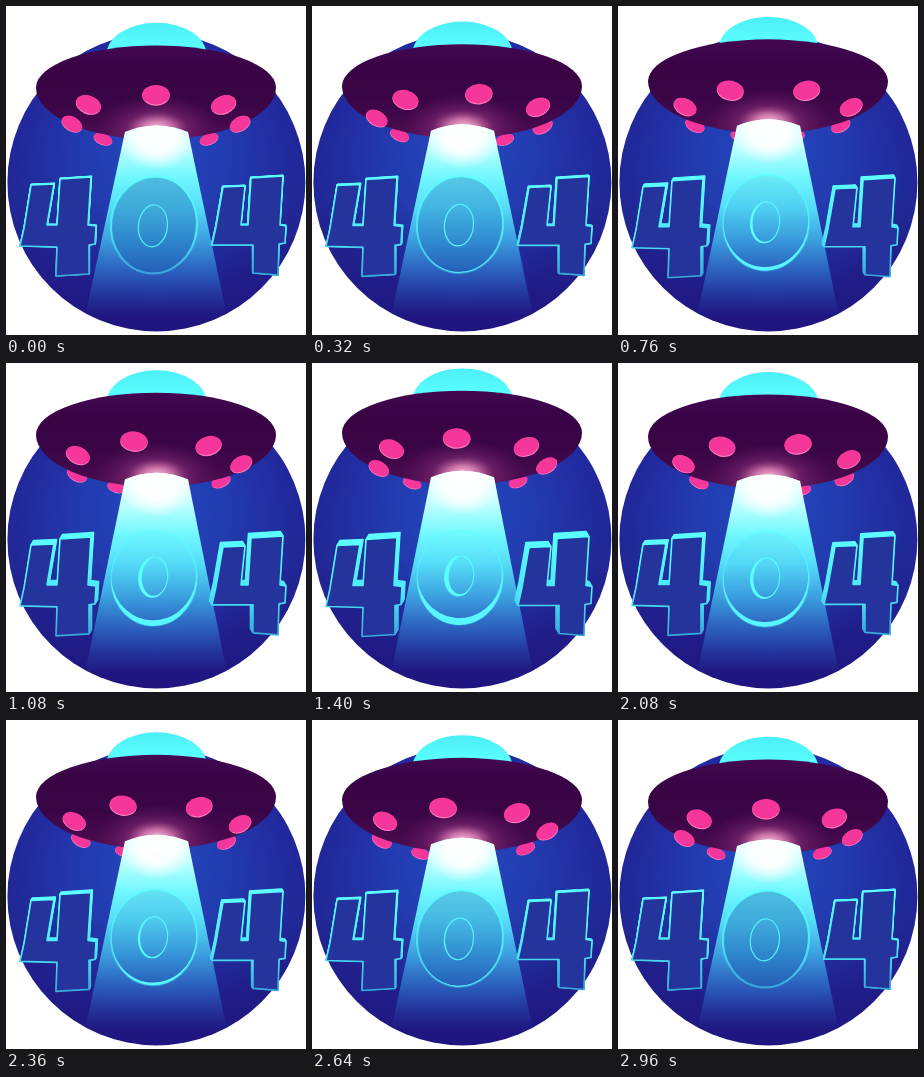
Animation, 300 px wide and 329 px high, one loop 3 s. Source, as an HTML page:

```html
<!DOCTYPE html>
<html lang="en">
<head>
<meta charset="utf-8">
<title>404</title>
<style>
  html, body { margin: 0; width: 100%; height: 100%; overflow: hidden; background: #fff; }
  svg { display: block; width: 300px; height: 329px; }
</style>
</head>
<body>
<svg viewBox="0 0 300 329" role="img" aria-label="404">
  <defs>
    <clipPath id="disc"><circle cx="150.4" cy="176.4" r="149"/></clipPath>
    <linearGradient id="sky" x2="0" y2="1">
      <stop offset="0" stop-color="#22209a"/>
      <stop offset=".6" stop-color="#212896"/>
      <stop offset="1" stop-color="#20147e"/>
    </linearGradient>
    <radialGradient id="haze" gradientUnits="userSpaceOnUse" cx="150" cy="145" r="150">
      <stop offset="0" stop-color="#234fc8" stop-opacity=".9"/>
      <stop offset=".5" stop-color="#2346bc" stop-opacity=".65"/>
      <stop offset="1" stop-color="#2240b4" stop-opacity="0"/>
    </radialGradient>
    <linearGradient id="ray" gradientUnits="userSpaceOnUse" x1="0" y1="112" x2="0" y2="310">
      <stop offset="0" stop-color="#efffff"/>
      <stop offset=".14" stop-color="#c4ffff"/>
      <stop offset=".3" stop-color="#70f8ff"/>
      <stop offset=".45" stop-color="#55dcf8"/>
      <stop offset=".62" stop-color="#3ca4e2" stop-opacity=".95"/>
      <stop offset=".8" stop-color="#2c68c4" stop-opacity=".75"/>
      <stop offset="1" stop-color="#2450b0" stop-opacity="0"/>
    </linearGradient>
    <linearGradient id="glass" x2="0" y2="1">
      <stop offset="0" stop-color="#4aeef6"/>
      <stop offset=".4" stop-color="#5cffff"/>
    </linearGradient>
    <linearGradient id="hull" x2="0" y2="1">
      <stop offset="0" stop-color="#420852"/>
      <stop offset=".25" stop-color="#390345"/>
      <stop offset=".6" stop-color="#3a0546"/>
      <stop offset="1" stop-color="#4c0c50"/>
    </linearGradient>
    <radialGradient id="glow">
      <stop offset="0" stop-color="#ffc9e4"/>
      <stop offset=".25" stop-color="#e688bb" stop-opacity=".8"/>
      <stop offset=".5" stop-color="#9c3a86" stop-opacity=".42"/>
      <stop offset="1" stop-color="#7a1c6a" stop-opacity="0"/>
    </radialGradient>
    <radialGradient id="spot">
      <stop offset="0" stop-color="#fff"/>
      <stop offset=".5" stop-color="#fff" stop-opacity=".9"/>
      <stop offset="1" stop-color="#fff" stop-opacity="0"/>
    </radialGradient>
    <linearGradient id="edge" x2="0" y2="1">
      <stop offset="0" stop-color="#5cffff"/>
      <stop offset=".6" stop-color="#4ce6f8"/>
      <stop offset="1" stop-color="#37a8dc"/>
    </linearGradient>
    <path id="shell" d="M30 0A120 42 0 0 1 270 0A120 52 0 0 1 30 0Z"/>
    <clipPath id="body"><use href="#shell"/></clipPath>
    <clipPath id="shaft"><path id="shaftPath"/></clipPath>
  </defs>

  <g clip-path="url(#disc)">
    <rect width="300" height="329" fill="url(#sky)"/>
    <rect width="300" height="329" fill="url(#haze)"/>
  </g>

  <g id="dome"><ellipse cx="150.5" cy="32" rx="50" ry="32" fill="url(#glass)"/></g>
  <g id="farLamps"></g>
  <g id="saucer">
    <use href="#shell" fill="url(#hull)"/>
    <g clip-path="url(#body)"><ellipse cx="151" cy="41" rx="62" ry="34" fill="url(#glow)"/></g>
  </g>
  <g id="nearLamps"></g>

  <g clip-path="url(#disc)">
    <path id="beam" fill="url(#ray)"/>
    <g clip-path="url(#shaft)"><ellipse id="hot" cx="151" rx="38" ry="32" fill="url(#spot)"/></g>
  </g>

  <g id="zero" fill-rule="evenodd">
    <ellipse id="face" fill="#1c62b0"/>
    <ellipse id="rim" fill="none" stroke="url(#edge)"/>
    <path id="side" fill="#58f6ff"/>
    <ellipse id="hole" fill="none" stroke="#58f0fc" stroke-width="1.2"/>
    <path id="wall" fill="#5cffff"/>
  </g>
  <g id="fours"></g>
</svg>
<script>
const LOOP = 3000, TICK = 40, LAMPS = 8, LAYERS = 5;
const $ = id => document.getElementById(id);

function set(el, attrs) {
  for (const key in attrs) el.setAttribute(key, attrs[key]);
}
function add(parent, tag, attrs = {}) {
  const el = document.createElementNS('http://www.w3.org/2000/svg', tag);
  set(el, attrs);
  return parent.appendChild(el);
}

const oval = (cx, cy, rx, ry) =>
  `M${cx - rx} ${cy}a${rx} ${ry} 0 1 0 ${2 * rx} 0a${rx} ${ry} 0 1 0 ${-2 * rx} 0Z`;

const fours = [
  { depth: [3, -5], points: '25,179 48,178 41,219 51,219 54,173 85,171 82,219 90,220 89,238 83,239 83,268 50,270 51,241 14,240 18,222' },
  { depth: [-3, -5], points: '217,181 239,180 235,219 242,219 245,172 277,170 274,219 280,220 279,237 273,238 272,269 247,267 247,239 206,239 210,221' }
].map(({ depth, points }) => {
  const layers = [];
  for (let i = LAYERS; i >= 0; i--) {
    const el = add($('fours'), 'polygon', {
      points, fill: i ? 'url(#edge)' : '#25349c',
      stroke: 'url(#edge)', 'stroke-width': 1.6, 'stroke-linejoin': 'round'
    });
    layers.push({ el, part: i / LAYERS });
  }
  return { depth, layers };
});

const lamps = Array.from({ length: LAMPS }, () => {
  const g = add($('nearLamps'), 'g');
  add(g, 'ellipse', { rx: 13.3, ry: 9.7, cy: .5, fill: '#ff7cc0' });
  add(g, 'ellipse', { rx: 13.2, ry: 9.4, cy: -.4, fill: '#f5379b' });
  return g;
});

// Ring of lamps seen from below: the near side is higher and larger,
// the far side only peeks out from behind the hull.
function drawLamps(phase, bob) {
  const midY = 111 + 7 * bob;
  lamps.forEach((lamp, i) => {
    const angle = phase * Math.PI / 2 + i * 2 * Math.PI / LAMPS;
    const near = Math.cos(angle), side = Math.sin(angle);
    const zoom = 1 / (1 - .17 * near);
    const x = 150 + 84 * side * zoom;
    const y = midY - 24 * near * zoom;
    const sx = zoom * (.84 + .02 * near);
    const sy = zoom * (.74 + .12 * near);
    const group = $(near < -.15 ? 'farLamps' : 'nearLamps');
    if (lamp.parentNode !== group) group.appendChild(lamp);
    set(lamp, { transform: `translate(${x} ${y}) rotate(${-30 * side}) scale(${sx} ${sy})` });
  });
}

function drawZero(turn) {
  const cx = 148, cy = 219 - 4 * turn, rx = 43, ry = 48.5 - 1.5 * turn;
  const shade = .4 * (1 - turn) ** 2;
  const hole = { cx: 147, cy: cy + 1 - 3 * turn, rx: 14.5, ry: 21 - turn };
  set($('zero'), { transform: `rotate(6 ${cx} ${cy})` });
  set($('face'), { cx, cy, rx, ry, 'fill-opacity': shade });
  set($('rim'), { cx, cy, rx, ry, 'stroke-width': 2.2 - turn, 'stroke-opacity': .95 - .45 * turn });
  set($('side'), { d: oval(cx, cy, rx, ry) + oval(cx - .8 * turn, cy - 3.5 * turn, rx - .8 * turn, ry - 3.5 * turn) });
  set($('hole'), hole);
  set($('wall'), {
    d: oval(hole.cx, hole.cy, hole.rx, hole.ry) +
       oval(hole.cx + 2 * turn, hole.cy - turn, hole.rx - 2 * turn, hole.ry - turn)
  });
}

function draw(time) {
  const phase = Math.floor(time % LOOP / TICK) * TICK / LOOP;
  const bob = Math.cos(phase * 2 * Math.PI);
  const turn = (1 - bob) / 2;

  set($('dome'), { transform: `translate(0 ${11 + 5.7 * bob})` });
  set($('saucer'), { transform: `translate(0 ${75.5 + 6 * bob})` });
  drawLamps(phase, bob);

  const top = 120 + 6 * bob;
  const d = `M119 ${top}Q150 ${top - 13} 182 ${top}L222 315H78Z`;
  set($('beam'), { d });
  set($('shaftPath'), { d });
  set($('hot'), { cy: top + 6 });

  drawZero(turn);
  for (const { depth, layers } of fours)
    for (const { el, part } of layers) {
      const reach = part * (.12 + .88 * turn);
      set(el, { transform: `translate(${depth[0] * reach} ${depth[1] * reach + 3.5 * turn})` });
    }
}

const start = performance.now();
function loop() {
  draw(performance.now() - start);
  requestAnimationFrame(loop);
}
loop();
</script>
</body>
</html>
```
